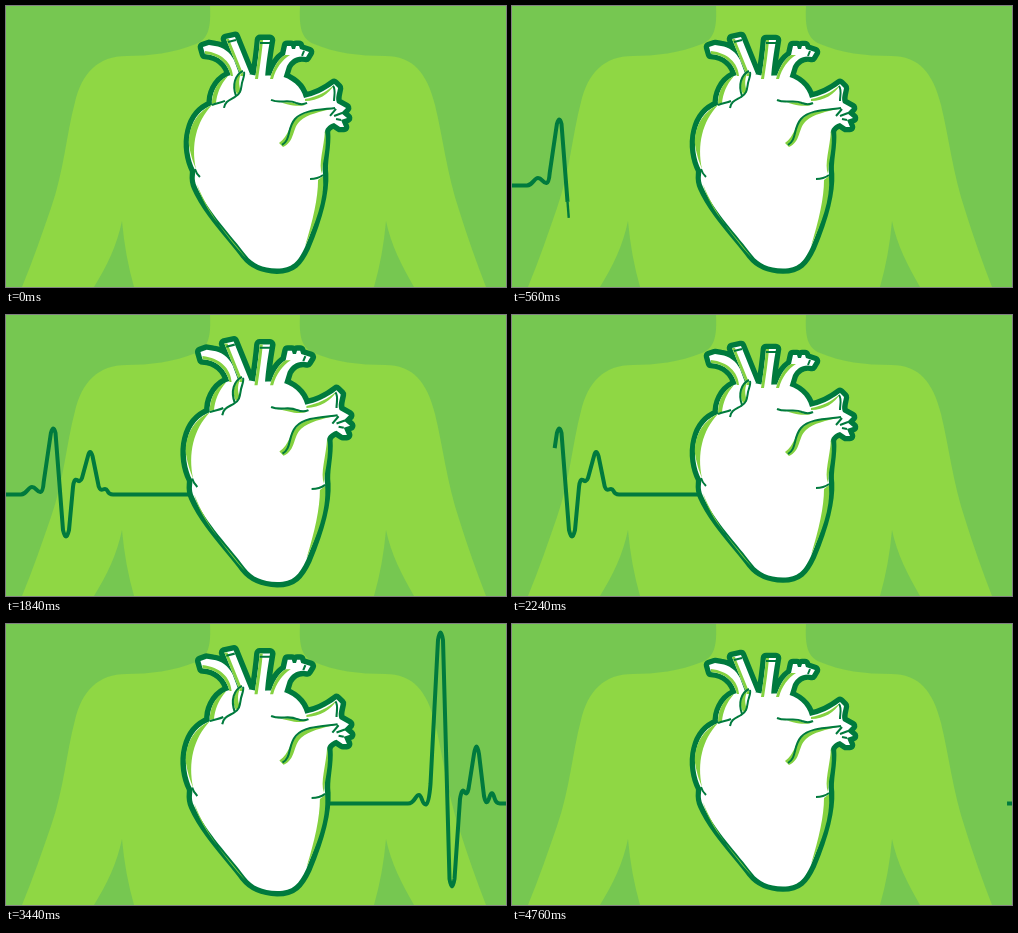
An HTML page with a canvas for the animation above (4.8 s loop, 500 by 281 pixels).

```html
<!DOCTYPE html>
<html lang="en">
<head>
<meta charset="utf-8">
<title>Heartbeat</title>
<style>
  html, body { margin: 0; width: 100%; height: 100%; overflow: hidden; background: #76c751; }
  canvas { display: block; width: 100vw; height: 100vh; }
</style>
</head>
<body>
<canvas></canvas>
<script>
const W = 500, H = 281, LOOP = 4800;
const BACK = '#76c751', SKIN = '#8fd744', DARK = '#007a3d', SHADE = '#84d13f';
const canvas = document.querySelector('canvas');
const ctx = canvas.getContext('2d');

const torso = new Path2D(`M204 0 C205 20 203 33 190 38 C168 47 143 50 121 50
  C92 50 76 67 69 96 C60 130 58 165 45 202 C36 228 27 254 16 281 L88 281
  C101 260 111 239 116 215 C118 238 122 260 128 281 L368 281
  C374 260 378 238 380 215 C385 239 396 260 408 281 L480 281
  C470 255 461 230 453 204 C441 168 437 132 429 99 C421 67 407 50 379 50
  C353 50 329 47 308 38 C295 33 293 20 294 0 Z`);

// Chambers first, then the four vessels on top; all wound clockwise.
const heart = new Path2D(`M271 262.5 C256 262 247 258 240 249
  C226 230 202 206 191 181 C187 172 190 169 189 164
  C184 154 181 139 184.5 125 C188 110 196 103 206 99 C205 89 210 76 222 70
  L231 67 L237 67 L252 70 L272 69 C286 73 295 80 298 92
  C308 90 319 85 328 78 L332 82 C331 88 329 92 331 97 L340 102 L335 107
  L341 112 L335 114 L338 121 L334 121 L328 117 C322 119 318 123 319 128
  C320 142 315 156 317 168 C318 190 309 217 299 241
  C292 256 286 262.5 271 262.5 Z
  M197 41 L203 39 L209 40 C217 41 224 46 228 54 L234 70 L225 70
  C222 58 214 49 199 48 Z
  M220 33 L229 31 L244 68 L235 70 Z
  M254 34 L264 34 C262 46 260 58 259 73 L249 73 C251 60 253 46 254 34 Z
  M279 49 L281 40 L285 40 L286 43 L289 43 L290 40 L293 40 L294 43
  L303 46 L300 51 C291 49 285 53 281 60 L277 73 L264 73 C267 62 272 53 279 49 Z`);

const shades = new Path2D(`M206 99 C189 107 182 123 183 139 C185 151 188 158 190 163
  C185 139 190 116 206 99 Z
  M191 178 C198 206 224 230 240 252 C228 239 202 208 191 178 Z
  M317 170 C319 194 309 218 299 240 C307 214 312 192 312 174 Z
  M319 124 C322 142 316 156 316 168 C312 158 318 142 319 124 Z
  M206 98 C206 86 211 75 222 70 C214 79 211 88 210 97 Z
  M231 88 C227 80 229 71 236 66 C231 75 234 82 235 86 Z
  M220 33 L235 70 L238 70 L223 33 Z
  M254 34 C253 46 251 60 249 73 L252 73 C254 60 256 46 257 34 Z
  M279 49 C272 53 267 62 264 73 L267 73 C270 62 276 54 284 49 Z
  M199 48 C214 49 222 58 225 70 L227 70 C226 57 216 47 199 45 Z
  M265 94 C274 99 282 94 290 98 C297 100 302 98 302 98 C292 102 284 99 265 94 Z
  M299 93 C310 91 319 87 328 79 C323 88 312 95 299 95 Z
  M273 137 C283 130 282 120 291 112 C300 105 312 103 329 102
  C313 106 302 108 294 115 C286 122 289 136 277 141 Z`);

const creases = new Path2D(`M206 99 C211 97 215 97 219 95
  M218 102 C219 95 224 94 229 91 C235 88 235 83 236 77 C237 73 239 69 238 66
  M230 90 C226 79 229 69 237 65
  M189 163 C190 167 192 169 194 171
  M317 169 C313 172 309 173 304 173
  M265 94 C274 98 282 93 290 97 C295 99 299 98 301 97
  M276 139 C285 134 281 122 289 113 C297 104 313 104 329 102
  M327 80 C330 84 328 89 328 95
  M330 103 L324 110 M336 107 L328 110 M335 114 L330 113
  M222 36 L230 34 M254 37 L264 37 M298 45 L296 50`);

const leftPulse = new Path2D(`M-5 179.5 L15 179.5 C21 179 22 172 26 172
  C30 172 31 177.5 34.5 177 Q37 176.5 37.7 167 L44.9 118 Q47.5 109 49.5 118
  L57 215 Q60 228 63 215 L67 172 Q68 163 71 165 Q74 168 76 163
  L82 141 Q84 133 86.5 141 L92 168 Q93 176 97 174.5
  Q100 173 101.5 176 Q103 179.5 107 179.5 L192 179.5`);

const rightPulse = new Path2D(`M310 179.5 L402 179.5 C409 179.5 409 171 413 171
  C416 171 416 181 420 180.5 Q423 179 424.5 160 L432 16 Q434.5 1 437 16
  L443.5 255 Q446 270 448.5 255 L454 175 Q456 163 458.5 168
  Q461 172 462.5 165 L468 130 Q470.5 115 473 130 L478 172
  Q480.5 184 483.5 173 Q486 165 488.5 174 Q490 179.5 494 179.5 L506 179.5`);

const clamp = x => Math.min(1, Math.max(0, x));
const easeSine = x => (1 - Math.cos(Math.PI * clamp(x))) / 2;

// Strokes the stretch of a path between two distances along it.
function strokePart(path, from, to, width) {
  if (to <= from) return;
  ctx.lineWidth = width;
  ctx.setLineDash([to - from, 5000]);
  ctx.lineDashOffset = -from;
  ctx.stroke(path);
  ctx.setLineDash([]);
}

function drawPulse(path, from, to, length) {
  const taper = to < length * 0.8 ? 16 : 0;
  strokePart(path, from, to - taper, 4);
  if (taper) strokePart(path, Math.max(from, to - taper), to, 2.4);
}

function drawHeart(t) {
  const phase = (t + 800 - 168) % 1600 - 800;
  const beat = Math.abs(phase) < 180 ? (1 + Math.cos(Math.PI * phase / 180)) / 2 : 0;
  const scale = 1 + 0.06 * beat;
  ctx.save();
  ctx.translate(263, 147);
  ctx.scale(scale, scale);
  ctx.translate(-263, -147);
  ctx.lineWidth = 10.6;
  ctx.stroke(heart);
  ctx.fillStyle = '#fff';
  ctx.fill(heart);
  ctx.fillStyle = SHADE;
  ctx.fill(shades);
  ctx.lineWidth = 2;
  ctx.stroke(creases);
  ctx.restore();
}

function draw(t) {
  const ratio = window.devicePixelRatio || 1;
  const w = Math.round(innerWidth * ratio), h = Math.round(innerHeight * ratio);
  if (canvas.width !== w || canvas.height !== h) {
    canvas.width = w;
    canvas.height = h;
  }
  ctx.setTransform(w / W, 0, 0, h / H, 0, 0);
  ctx.fillStyle = BACK;
  ctx.fillRect(0, 0, W, H);
  ctx.fillStyle = SKIN;
  ctx.fill(torso);

  ctx.strokeStyle = DARK;
  ctx.lineJoin = 'round';
  ctx.lineCap = 'butt';
  const leftTip = Math.min(470, 0.425 * Math.max(0, t - 70));
  const leftTail = 0.57 * Math.max(0, t - 2085);
  drawPulse(leftPulse, leftTail, leftTip, 470);

  const rightTip = Math.min(820, 0.00101 * Math.max(0, t - 2514) ** 2);
  const rightTail = 796 * easeSine((t - 3840) / 1010);
  drawPulse(rightPulse, rightTail, rightTip, 800);

  drawHeart(t);
}

function tick() {
  draw(performance.now() % LOOP);
  requestAnimationFrame(tick);
}
tick();
</script>
</body>
</html>
```
